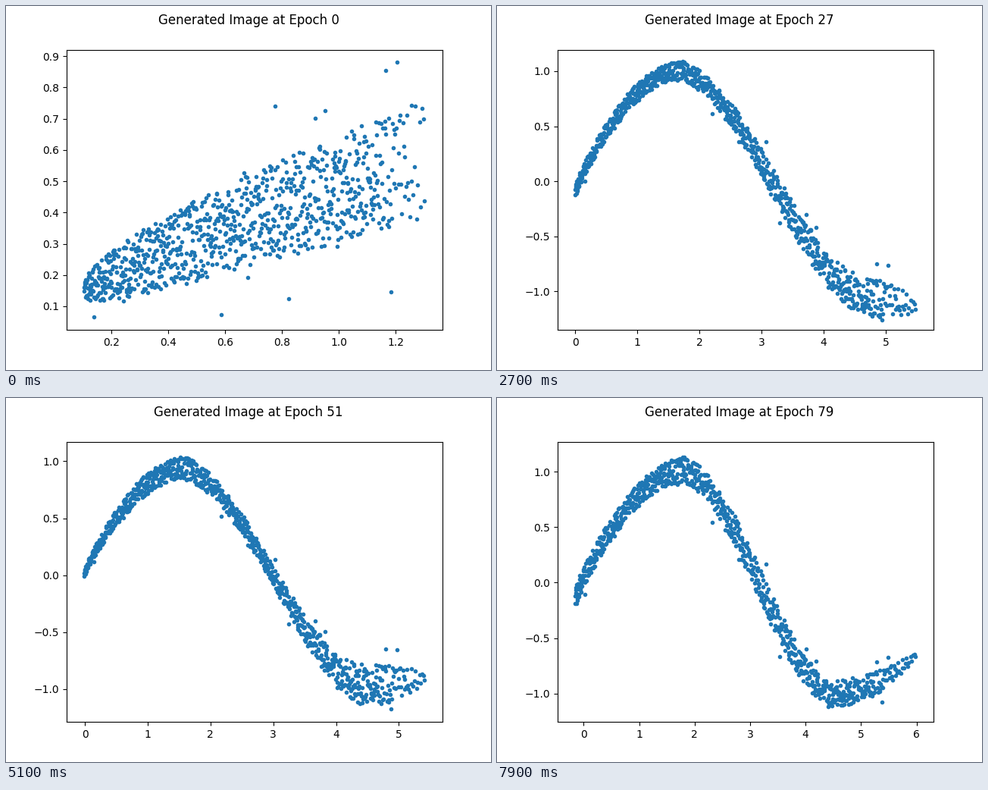
Write a matplotlib script that moves like this. It is 640x480 px and loops after 8 s.

```python
import numpy as np
import matplotlib.pyplot as plt
from matplotlib.animation import FuncAnimation

FRAMES, INTERVAL = 80, 100
COUNT = 900

rng = np.random.default_rng(7)
rank = (np.arange(COUNT) + rng.random(COUNT)) / COUNT
side = rng.uniform(-1, 1, COUNT)
side[rng.random(COUNT) < .04] *= 2.2  # a few strays


def spread(x0, x1, tail=.08):
    """Nearly even x positions that thin out towards the right end."""
    return x0 + (x1 - x0) * (rank ** 1.05 + tail * rank ** 40) / (1 + tail)


def stage(x, mid, half, box):
    return x, np.clip(mid + half * side, box[2], box[3]), np.array(box)


def fan(box):
    """Wedge that opens to the right."""
    x = spread(*box[:2])
    s = (x - box[0]) / (box[1] - box[0])
    return stage(x, .155 + .42 * s ** .9, .19 * s ** .35, box)


def hook(box, peak=1.4):
    """Parabola up to the peak, then a widening straight descent."""
    x = spread(*box[:2], tail=.03)
    before, after = np.maximum(peak - x, 0), np.maximum(x - peak, 0)
    return stage(x, .95 - .62 * before ** 2 - .51 * after,
                 .08 + .13 * after, box)


def wave(box, peak, trough, ends, widths):
    """Sine-like band; widths at start, rise, peak, fall and trough."""
    x0, x1, bottom, top = box
    x = spread(x0, x1)
    high, low = top - 1.2 * widths[2], bottom + 1.2 * widths[4]
    rise = np.clip((x - x0) / (peak - x0), 0, 1)
    fall = np.clip((x - peak) / (trough - peak), 0, 1)
    out = np.clip((x - trough) / (x1 - trough), 0, 1)
    mid = (ends[0] + (high - ends[0]) * np.sin(rise * np.pi / 2) ** .85
           + (low - high) * (.7 * (1 - np.cos(np.pi * fall)) / 2 + .3 * fall)
           + (ends[1] - low) * out ** 2)
    at = [x0, (x0 + peak) / 2, peak, (peak + trough) / 2, trough]
    return stage(x, mid, np.interp(x, at, widths) * (1 - .9 * out ** 3), box)


# box: left, right, bottom and top of the data
stages = {
    0: fan((.103, 1.305, .065, .88)),
    7: hook((.38, 6.09, -1.985, 1.05)),
    19: wave((-.047, 5.296, -1.295, 1.015), 1.65, 4.5, (-.2, -1.2),
             (.08, .1, .09, .15, .18)),
    36: wave((.039, 5.71, -1.169, 1.153), 1.8, 4.85, (0, -1.05),
             (.03, .06, .08, .11, .17)),
    51: wave((-.018, 5.422, -1.176, 1.06), 1.6, 4.4, (0, -.9),
             (.03, .09, .1, .08, .18)),
    60: wave((.037, 5.509, -1.288, .944), 1.7, 4.35, (-.12, -.95),
             (.06, .1, .1, .08, .19)),
    79: wave((-.163, 5.999, -1.143, 1.158), 1.85, 4.45, (-.15, -.645),
             (.09, .1, .12, .15, .12)),
}
epochs = sorted(stages)


def state(epoch):
    k = min(np.searchsorted(epochs, epoch, "right") - 1, len(epochs) - 2)
    a, b = epochs[k], epochs[k + 1]
    t = (epoch - a) / (b - a)
    x, y, box = [(1 - t) * p + t * q for p, q in zip(stages[a], stages[b])]
    # slight unrest between the stages
    return x, y + .03 * np.sin(np.pi * t) * np.sin(2.1 * epoch + x), box


def padded(low, high):
    pad = .05 * (high - low)
    return low - pad, high + pad


fig, ax = plt.subplots(figsize=(6.4, 4.8), dpi=100)
title = fig.suptitle("")
dots, = ax.plot([], [], ".", color="#1f77b4")


def draw(epoch):
    x, y, box = state(epoch)
    dots.set_data(x, y)
    ax.set_xlim(padded(*box[:2]))
    ax.set_ylim(padded(*box[2:]))
    title.set_text(f"Generated Image at Epoch {epoch}")
    return dots, title


anim = FuncAnimation(fig, draw, frames=FRAMES, interval=INTERVAL, repeat=True)
plt.show()
```
